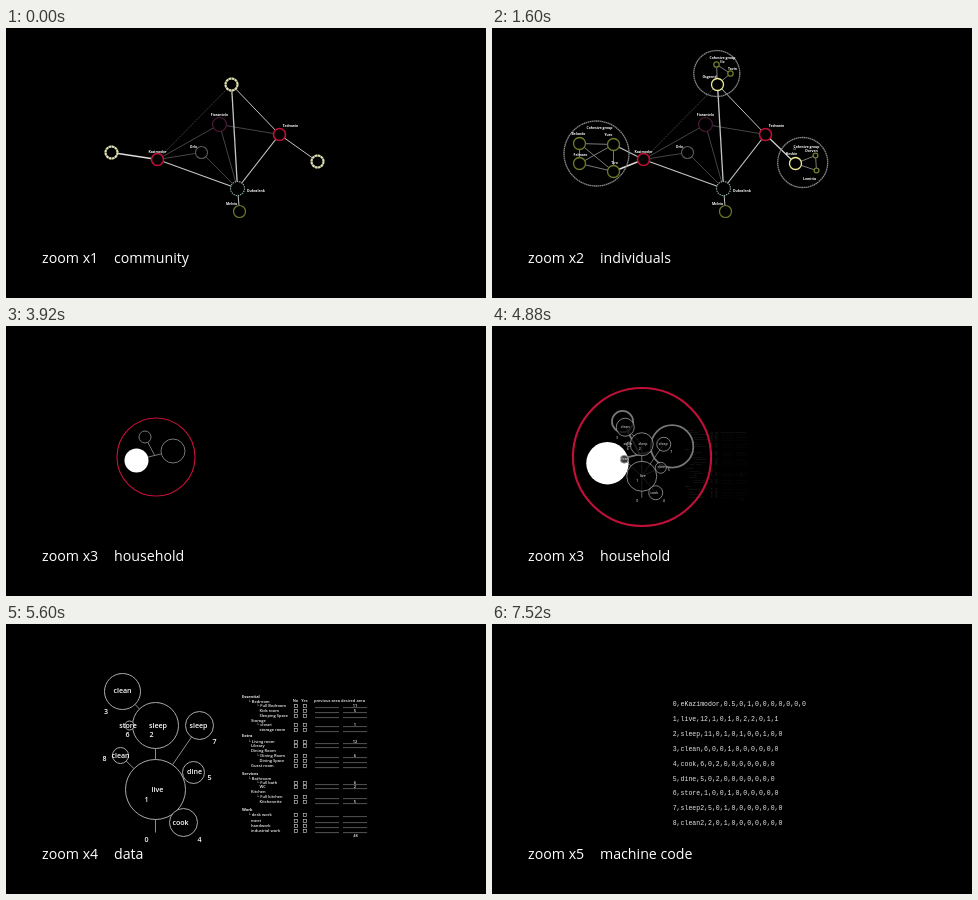
Animation of 480 by 270 pixels, one loop 9920 ms. Source, as an HTML page with a canvas:

```html
<!DOCTYPE html>
<html lang="en">
<head>
<meta charset="utf-8">
<title>Zoom levels</title>
<style>
html, body { margin: 0; width: 100%; height: 100%; overflow: hidden; background: #000; }
canvas { display: block; width: 480px; height: 270px; }
</style>
</head>
<body>
<canvas id="stage" width="480" height="270"></canvas>
<script>
const ctx = document.getElementById('stage').getContext('2d');
const LOOP = 9920, STEP = 80;
const SANS = '"Open Sans", "Noto Sans", sans-serif';
const MONO = '"Liberation Mono", monospace';
const FOCUS = [150, 131];
const RED = '#c01038', OLIVE = '#707a2c', CREAM = '#dedfb4', YELLOW = '#ecec98';

const clamp = v => Math.max(0, Math.min(1, v));
const ramp = (t, from, to) => clamp((t - from) / (to - from));

function layer(alpha, draw) {
  if (alpha <= 0) return;
  ctx.save();
  ctx.globalAlpha *= alpha;
  draw();
  ctx.restore();
}

function zoom(s, [x, y], draw) {
  ctx.save();
  ctx.translate(x, y);
  ctx.scale(s, s);
  ctx.translate(-x, -y);
  draw();
  ctx.restore();
}

// Puts whole coordinates on pixel centres
function centred(draw) {
  ctx.save();
  ctx.translate(0.5, 0.5);
  draw();
  ctx.restore();
}

function line(x1, y1, x2, y2, color, w = 1, dash = []) {
  ctx.strokeStyle = color;
  ctx.lineWidth = w;
  ctx.setLineDash(dash);
  ctx.beginPath();
  ctx.moveTo(x1, y1);
  ctx.lineTo(x2, y2);
  ctx.stroke();
}

function ring(x, y, r, color, w = 1, fill = null, dash = []) {
  ctx.beginPath();
  ctx.arc(x, y, r, 0, Math.PI * 2);
  if (fill) { ctx.fillStyle = fill; ctx.fill(); }
  if (!color) return;
  ctx.strokeStyle = color;
  ctx.lineWidth = w;
  ctx.setLineDash(dash);
  ctx.stroke();
}

function text(s, x, y, size, align = 'center', color = '#fff', weight = 400, family = SANS) {
  ctx.font = `${weight} ${size}px ${family}`;
  ctx.textAlign = align;
  ctx.textBaseline = 'alphabetic';
  ctx.fillStyle = color;
  ctx.fillText(s, x, y);
}

const name = (s, x, y, align) => text(s, x, y + 1, 3.4, align, '#fff', 700);

// Community network
function links() {
  const dim = '#454545', lit = '#c4c4c4';
  line(225, 56, 151, 131, '#505050', 0.8, [2, 1]);
  line(213, 96, 151, 131, dim);
  line(213, 96, 273, 106, dim);
  line(213, 96, 231, 160, dim);
  line(195, 124, 151, 131, dim);
  line(195, 124, 231, 160, dim);
  line(225, 56, 273, 106, lit);
  line(225, 56, 231, 160, lit, 1.3);
  line(273, 106, 231, 160, lit, 1.2);
  line(151, 131, 231, 160, lit, 1.2);
  line(231, 160, 233, 183, lit);
}

function members(picked) {
  ring(213, 96, 7, '#4e1a38', 1.2, '#000');
  ring(195, 124, 6, '#5a5a5a', 1.1, '#000');
  ring(231, 160, 7, '#8fb0aa', 1.2, '#000', [1.3, 1]);
  ring(233, 183, 6, OLIVE, 1.2, '#000');
  ring(273, 106, 6, RED, 1.6, '#000');
  ring(151, 131, 6, RED, 1.6, '#000', picked ? [1.4, 1.6] : []);
  name('Fiorantelo', 213, 86.5);
  name('Tedrowin', 284, 97.5);
  name('Kazimodor', 151, 123);
  name('Orlo', 187, 118);
  name('Dubralenk', 240.5, 162, 'left');
  name('Melvia', 225, 175.5);
}

function closed() {
  line(105, 124, 151, 131, '#ddd', 1.4);
  line(273, 106, 311, 133, '#c4c4c4');
  for (const [x, y] of [[105, 124], [225, 56], [311, 133]]) {
    ring(x, y, 6, '#6c6d50', 2, '#000');
    ring(x, y, 6, CREAM, 2, null, [2.4, 0.7]);
  }
}

function group(x, y, r, nodes, tx, ty) {
  ring(x, y, r, '#858585', 1.3, null, [1.6, 0.4]);
  nodes.forEach(([ax, ay], i) => {
    for (const [bx, by] of nodes.slice(i + 1)) line(ax, ay, bx, by, '#888', 0.9);
  });
  for (const [nx, ny, nr, color, label, lx, ly] of nodes) {
    ring(nx, ny, nr, color, 1.3, '#000');
    name(label, lx, ly);
  }
  name('Cohesive group', tx, ty);
}

function opened() {
  line(121, 116, 151, 131, '#c4c4c4', 1.1);
  line(121, 143, 151, 131, '#ddd', 1.4);
  line(273, 106, 303, 135, '#d4d4d4', 1.2);
  group(104, 125, 32.5, [
    [87, 115, 6, OLIVE, 'Belando', 86, 105],
    [121, 116, 6, OLIVE, 'Yuro', 116, 106],
    [87, 135, 6, OLIVE, 'Felmaro', 88, 126],
    [121, 143, 6, OLIVE, 'Tiro', 122, 134.5]
  ], 107, 99.5);
  group(224.3, 45, 23, [
    [225, 56, 6, YELLOW, 'Osgrend', 217, 48],
    [224, 36, 2.7, OLIVE, 'Ilo', 230, 33],
    [238, 45, 2.7, OLIVE, 'Tavin', 240, 40]
  ], 230, 29);
  group(310.2, 134, 25, [
    [303, 135, 6, YELLOW, 'Hesbin', 299, 125],
    [323, 127, 2.4, OLIVE, 'Dorven', 319, 122],
    [324, 142, 2.4, OLIVE, 'Lomiria', 317, 150]
  ], 314, 118);
  name('△', 302, 119);
}

function network(open, picked) {
  links();
  layer(1 - open, closed);
  layer(open, opened);
  members(picked);
}

// Household
function household(inner, dot = 12) {
  ring(150, 131, 39, RED, 1.2);
  layer(inner, () => {
    line(139, 111, 149, 130, '#777');
    line(130, 134, 167, 125, '#777');
    ring(139, 111, 6, '#777', 1, '#000');
    ring(167, 125, 12, '#777', 1, '#000');
  });
  ring(130.5, 134.5, dot, null, 0, '#fff');
}

// Rooms: label, x, y, radius, label x, label y, number, number x, number y
const rooms = [
  ['clean', 116, 67, 18, 116, 66, 3, 99.5, 87.5],
  ['sleep', 149, 101, 23, 151.5, 101, 2, 145, 110],
  ['sleep', 193, 101, 14, 192, 101, 7, 208, 117],
  ['live', 149, 165, 30, 151, 165, 1, 140, 175],
  ['dine', 187, 148, 11, 188, 147, 5, 203, 153],
  ['cook', 177, 198, 14, 174, 198, 4, 193, 215],
  ['clean', 114, 131, 8, 114, 131, 8, 98, 134],
  ['store', 123, 101, 4.5, 121.5, 101, 6, 121, 110]
];

function diagram(s) {
  const gray = '#8c8c8c', w = 1 / s;
  const put = (label, x, y) => text(label, x, y + 2, 7.1, 'center', '#fff', 600);
  line(116, 67, 149, 101, gray, w);
  line(149, 101, 149, 208, gray, w);
  for (const [x, y] of [[193, 101], [187, 148], [177, 198], [114, 131]]) line(x, y, 149, 165, gray, w);
  for (const [, x, y, r] of rooms) ring(x, y, r, '#aaa', w, '#000');
  for (const [label, , , , lx, ly, n, nx, ny] of rooms) {
    put(label, lx, ly);
    put(n, nx, ny);
  }
  put('0', 140, 215);
}

// Table rows: label, indent, y, has boxes, desired area
const rows = [
  ['Essential', 0, 73], ['└ Bedroom', 1, 78], ['└ Full Bedroom', 2, 82, 1, 11], ['Kids room', 2, 87, 1, 5],
  ['Sleeping Space', 2, 92, 1], ['Storage', 1, 97], ['└ closet', 2, 101, 1, 1], ['storage room', 2, 106, 1],
  ['Extra', 0, 112], ['└ Living room', 1, 118, 1, 12], ['Library', 1, 122, 1], ['Dining Room', 1, 127],
  ['└ Dining Room', 2, 132, 1, 6], ['Dining Space', 2, 137, 1], ['Guest room', 1, 142, 1],
  ['Services', 0, 150], ['└ Bathroom', 1, 155], ['└ Full bath', 2, 159, 1, 6], ['WC', 2, 163, 1, 2],
  ['Kitchen', 1, 168], ['└ Full kitchen', 2, 173, 1], ['Kitchenette', 2, 178, 1, 5],
  ['Work', 0, 186], ['└ desk work', 1, 191, 1], ['meet', 1, 197, 1], ['handwork', 1, 202, 1],
  ['industrial work', 1, 207, 1]
];

function table() {
  const put = (s, x, y, align, weight = 600) => text(s, x, y + 1.4, 4, align, '#f0f0f0', weight);
  put('No', 289.5, 77);
  put('Yes', 298.5, 77);
  put('previous area', 321, 77);
  put('desired area', 347, 77);
  for (const [label, indent, y, boxes, area] of rows) {
    const hook = label[0] === '└' ? 3 : 0;
    put(label, [236, 245, 253.5][indent] - hook, y, 'left', indent ? 600 : 700);
    if (!boxes) continue;
    ctx.strokeStyle = '#bbb';
    ctx.lineWidth = 0.7;
    ctx.setLineDash([]);
    ctx.strokeRect(288.3, y - 1.6, 3.2, 3.2);
    ctx.strokeRect(297.3, y - 1.6, 3.2, 3.2);
    line(309, y + 1.6, 333, y + 1.6, '#777', 0.7);
    line(337, y + 1.6, 361, y + 1.6, '#777', 0.7);
    if (area) put(area, 349, y - 0.3);
  }
  put('48', 349.5, 212);
}

// Machine code
const code = [
  '0,eKazimodor,0.5,0,1,0,0,0,0,0,0,0',
  '1,live,12,1,0,1,0,2,2,0,1,1',
  '2,sleep,11,0,1,0,1,0,0,1,0,0',
  '3,clean,6,0,0,1,0,0,0,0,0,0',
  '4,cook,6,0,2,0,0,0,0,0,0,0',
  '5,dine,5,0,2,0,0,0,0,0,0,0',
  '6,store,1,0,0,1,0,0,0,0,0,0',
  '7,sleep2,5,0,1,0,0,0,0,0,0,0',
  '8,clean2,2,0,1,0,0,0,0,0,0,0'
];

function listing() {
  code.forEach((s, i) => text(s, 180.7, 82 + i * 14.9, 6.54, 'left', '#e4e4e4', 400, MONO));
}

const levels = ['community', 'individuals', 'household', 'data', 'machine code'];

function caption(i, alpha = 1) {
  layer(alpha, () => {
    for (const [s, x] of [['zoom x' + (i + 1), 36], [levels[i], 108]]) {
      text(s, x, 235.4, 14.2, 'left', '#fff', 500);
    }
  });
}

function captions(t) {
  const starts = [0, 1120, 3360, 5200, 7520];
  if (t >= 7360 && t < 7520) {
    caption(3, 0.5);
    caption(4, 0.5);
  } else {
    caption(starts.filter(s => t >= s).length - 1);
  }
}

function scene(t) {
  ctx.fillStyle = '#000';
  ctx.fillRect(0, 0, 480, 270);

  if (t < 3440) {
    const p = ramp(t, 3200, 3440), s = 1 + 5.5 * p;
    const pick = ramp(t, 2800, 3120);
    layer(1 - p, () => zoom(s, FOCUS, () => centred(() => network(ramp(t, 960, 1280), pick > 0))));
    layer(p, () => zoom(s / 6.5, FOCUS, () => household(0.6)));
    layer(pick, () => zoom(s / 6.5, FOCUS, () => ring(130.5, 134.5, 15 - 3 * p, null, 0, '#fff')));
  } else if (t < 4880) {
    household(t < 3600 ? 0.6 : t < 3920 ? 0.8 : 1);
  } else if (t < 7520) {
    const q = ramp(t, 4880, 5600), s = 0.5 + 0.5 * q;
    layer(1 - 3 * q, () => zoom(3.54 * s, FOCUS, () => household(1)));
    zoom(s, [150, 135], () => {
      layer(0.75 + 0.25 * q, () => centred(() => diagram(s)));
      layer(0.15 + 0.85 * q, table);
    });
  } else {
    listing();
  }
  captions(t);
}

const start = performance.now();
function tick() {
  const t = (performance.now() - start) % LOOP;
  scene(Math.floor(t / STEP) * STEP);
  requestAnimationFrame(tick);
}
tick();
</script>
</body>
</html>
```
